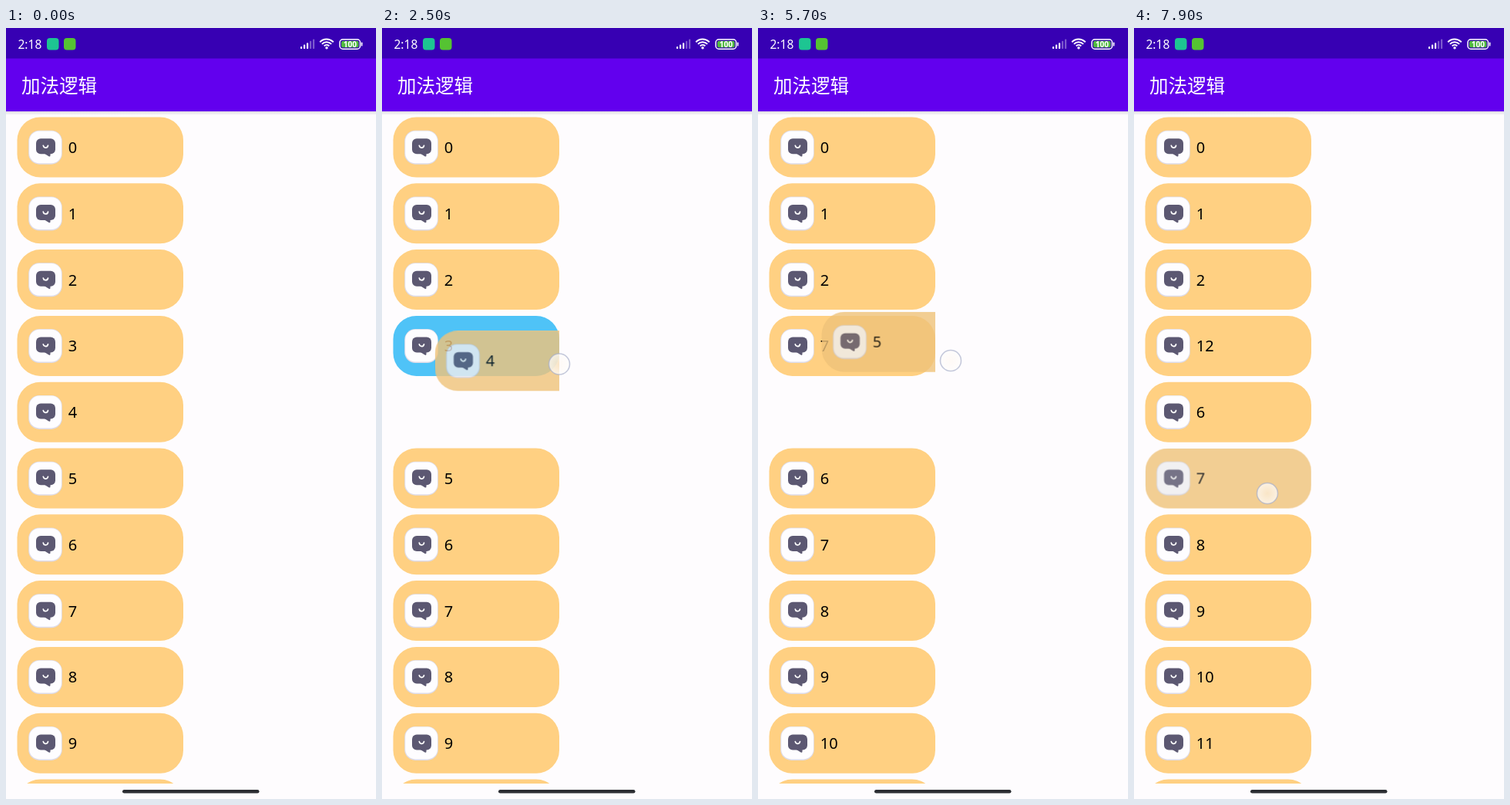
Animation, 480 px wide and 999 px high, one loop 8000 ms. Source, as an HTML page with a canvas:

```html
<!DOCTYPE html>
<html lang="zh-CN">
<head>
<meta charset="utf-8">
<style>
html, body { margin: 0; width: 100%; height: 100%; overflow: hidden; background: #fefcfe; }
canvas { display: block; width: 480px; height: 999px; }
</style>
</head>
<body>
<canvas id="stage" width="480" height="999"></canvas>
<script>
const LOOP = 8000, STEP = 100;
const ROW = { x: 14.5, top: 115.5, w: 215.5, h: 78, pitch: 85.8, r: 30 };
const ORANGE = '#ffd082', BLUE = '#4fc3f7', PAPER = '#fefcfe';
const stage = document.getElementById('stage').getContext('2d');
const layer = document.createElement('canvas');
layer.width = 300;
layer.height = 100;
const ghost = layer.getContext('2d');

// Each gesture: touch down, long press, release, merge; path keys are [time, dx, dy].
const gestures = [
  { down: 1200, press: 1600, up: 3300, merge: 3400, row: 4, x: 176, y: 502,
    path: [[1600, 0, 0], [1800, 0, 1], [1900, 0, 2], [2100, 8, -7], [2500, 54, -66.5],
           [2800, 58, -73], [3100, 58, -73], [3200, 56, -72]] },
  { down: 4300, press: 4700, up: 6700, merge: 6800, row: 4, x: 182, y: 522,
    path: [[4700, 0, 0], [4900, 0, 0], [5000, 8, -10], [5400, 62, -76], [5600, 62, -76],
           [5700, 68, -91], [6100, 38, -67]] },
  { down: 7500, press: 7900, up: 9000, merge: 9100, row: 5, x: 173, y: 603,
    path: [[7900, 0, 0]] }
];

function along(path, t) {
  if (t <= path[0][0]) return path[0].slice(1);
  for (let i = 1; i < path.length; i++) {
    const [t0, x0, y0] = path[i - 1], [t1, x1, y1] = path[i];
    if (t <= t1) {
      const k = (t - t0) / (t1 - t0);
      return [x0 + (x1 - x0) * k, y0 + (y1 - y0) * k];
    }
  }
  return path[path.length - 1].slice(1);
}

function box(c, x, y, w, h, r, fill) {
  c.beginPath();
  c.roundRect(x, y, w, h, r);
  c.fillStyle = fill;
  c.fill();
}

function label(c, text, x, y, font, fill) {
  c.font = font;
  c.fillStyle = fill;
  c.fillText(text, x, y);
}

function icon(c, x, y) {
  box(c, x - 0.8, y - 0.5, 43.6, 44, 14, '#dddbe8');
  box(c, x + 0.2, y + 0.2, 41.8, 41.8, 13, '#fefdff');
  box(c, x + 9, y + 10, 25, 20, 6, '#5c5872');
  c.beginPath();
  c.moveTo(x + 19, y + 29);
  c.lineTo(x + 25.5, y + 33);
  c.quadraticCurveTo(x + 27.5, y + 34, x + 27.5, y + 32);
  c.lineTo(x + 27.5, y + 28);
  c.fill();
  c.beginPath();
  c.arc(x + 21.4, y + 18.8, 3.1, 0.15, Math.PI - 0.15);
  c.strokeStyle = '#fff';
  c.lineWidth = 1.8;
  c.lineCap = 'round';
  c.stroke();
}

function row(c, x, y, value, fill) {
  box(c, x, y, ROW.w, ROW.h, ROW.r, fill);
  icon(c, x + 15.5, y + 17.7);
  label(c, value, x + 66.3, y + 46.4, '20px "Noto Sans", sans-serif', '#000');
}

function heldRow(x, y, value) {
  ghost.clearRect(0, 0, 300, 100);
  row(ghost, 0, 0, value, ORANGE);
  stage.globalAlpha = 0.8;
  stage.drawImage(layer, x, y);
  stage.globalAlpha = 1;
  box(stage, x, y, ROW.w, ROW.h, ROW.r, 'rgba(0,0,0,0.05)');
}

function ring(x, y, alpha) {
  const c = stage, g = c.createRadialGradient(x, y, 0, x, y, 13);
  g.addColorStop(0, 'rgba(255,248,240,0.55)');
  g.addColorStop(1, 'rgba(255,253,252,0.75)');
  c.globalAlpha = alpha;
  c.beginPath();
  c.arc(x, y, 13.5, 0, 7);
  c.fillStyle = g;
  c.fill();
  c.lineWidth = 1.6;
  c.strokeStyle = 'rgba(165,172,200,0.65)';
  c.stroke();
  c.globalAlpha = 1;
}

function statusBar() {
  const c = stage;
  label(c, '2:18', 15.5, 26.8, '500 15.5px "Noto Sans", sans-serif', '#fff');
  box(c, 53, 13, 15.5, 15.5, 4, '#1dc592');
  box(c, 75, 13, 15.5, 15.5, 4, '#55c332');

  for (let i = 0; i < 5; i++) {
    const h = 3 + i * 2.4;
    box(c, 382 + i * 4, 27 - h, 2.2, h, 0.8, i < 3 ? '#fff' : 'rgba(255,255,255,0.35)');
  }

  c.strokeStyle = '#fff';
  c.lineWidth = 2;
  c.lineCap = 'butt';
  for (const r of [4.5, 8.3, 12]) {
    c.beginPath();
    c.arc(416, 26.5, r, -Math.PI * 0.76, -Math.PI * 0.24);
    c.stroke();
  }
  c.beginPath();
  c.arc(416, 25.7, 1.7, 0, 7);
  c.fillStyle = '#fff';
  c.fill();

  c.beginPath();
  c.roundRect(433, 14.8, 26.5, 12.4, 4);
  c.lineWidth = 1.5;
  c.stroke();
  box(c, 435, 16.8, 22.5, 8.4, 2, '#4fb83f');
  box(c, 460.8, 18.5, 1.6, 5, 0.8, '#fff');
  c.textAlign = 'center';
  label(c, '100', 446.3, 24.7, '600 10px "Noto Sans", sans-serif', '#fff');
  c.textAlign = 'left';
}

function header() {
  const c = stage, shade = c.createLinearGradient(0, 107, 0, 113);
  shade.addColorStop(0, 'rgba(60,50,80,0.2)');
  shade.addColorStop(1, 'rgba(60,50,80,0)');
  c.fillStyle = shade;
  c.fillRect(0, 107, 480, 6);
  c.fillStyle = '#6200ee';
  c.fillRect(0, 39, 480, 69);
  c.fillStyle = '#3700b3';
  c.fillRect(0, 0, 480, 39.5);
  statusBar();
  label(c, '加法逻辑', 20, 83.8,
    '500 24.5px "Noto Sans CJK SC", "Noto Sans CJK", sans-serif', '#fff');
}

function draw(t) {
  const c = stage;
  const merges = gestures.filter(g => t >= g.merge).length;
  const touch = gestures.find(g => t >= g.down && t < g.merge);
  const held = touch && t >= touch.press && t < touch.up ? touch.row : -1;
  const [dx, dy] = touch ? along(touch.path, t) : [0, 0];
  const valueAt = i => i < 3 ? i : i === 3 ? [3, 7, 12][merges] : i + merges;
  const topOf = i => ROW.top + i * ROW.pitch;
  const over = held >= 0 && dy < -ROW.pitch / 2 && dy > -ROW.pitch;

  c.fillStyle = PAPER;
  c.fillRect(0, 0, 480, 999);

  c.save();
  c.beginPath();
  c.rect(0, 107, ROW.x + ROW.w, 872);
  c.clip();
  for (let i = 0; i <= 10; i++) {
    if (i !== held) row(c, ROW.x, topOf(i), valueAt(i), over && i === held - 1 ? BLUE : ORANGE);
  }
  if (held >= 0) heldRow(ROW.x + dx, topOf(held) + dy, valueAt(held));
  c.restore();

  header();
  box(c, 151, 987, 177.5, 4.6, 2.3, '#2c2e33');
  if (touch) ring(touch.x + dx, touch.y + dy, t >= touch.up ? 0.5 : 1);
}

function tick() {
  draw(Math.floor(performance.now() % LOOP / STEP) * STEP);
  requestAnimationFrame(tick);
}
tick();
</script>
</body>
</html>
```
